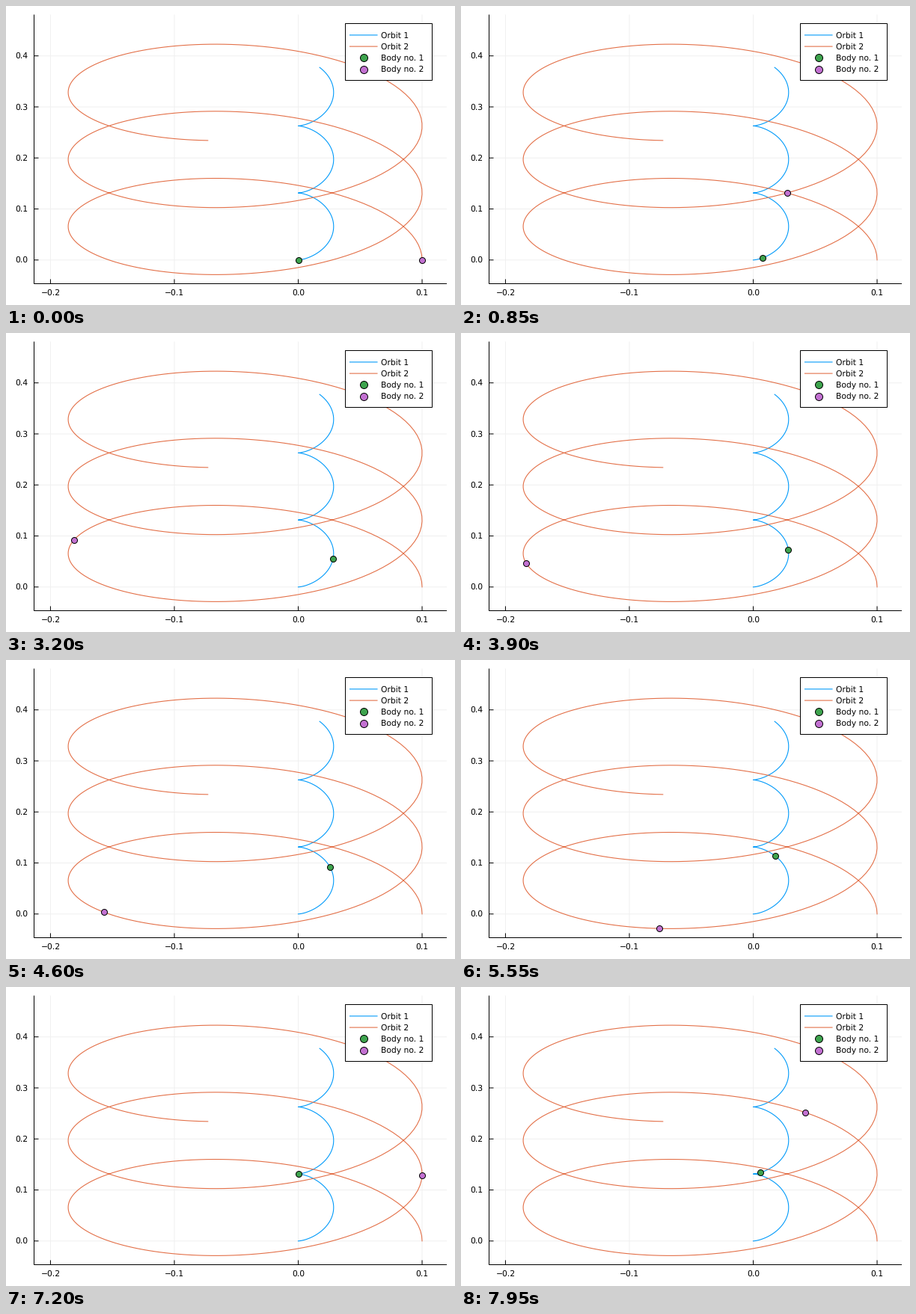
A matplotlib script for the animation above (8000 ms loop, 600 by 400 pixels).

```python
import numpy as np
import matplotlib.pyplot as plt
from matplotlib.animation import FuncAnimation

DPI = 100
PX = 72 / DPI            # points per pixel
FRAMES, INTERVAL = 160, 50

BLUE, ORANGE = "#009afa", "#e36f47"
GREEN, PURPLE = "#3ea44e", "#c371d2"

plt.rcParams["text.hinting"] = "none"

# Two bodies of mass 1 and 0.1: the heavy one starts at rest,
# the light one at periapsis with 1.5 times the circular energy.
M1, M2, R0 = 1.0, 0.1, 0.1
M = M1 + M2
SPEED = np.sqrt(1.5 * M1 / R0)
ECC = SPEED**2 * R0 / M - 1
A = R0 / (1 - ECC)
B = A * np.sqrt(1 - ECC**2)
PERIOD = 2 * np.pi * np.sqrt(A**3 / M)
STEP = 0.006932 * PERIOD
STEPS = 400


def bodies(t):
    """Positions (x1, y1, x2, y2) at time t from Kepler's equation."""
    mean = 2 * np.pi * np.asarray(t, float) / PERIOD
    e = mean + ECC * np.sin(mean)
    for _ in range(12):
        e = e - (e - ECC * np.sin(e) - mean) / (1 - ECC * np.cos(e))
    rx, ry = A * (np.cos(e) - ECC), B * np.sin(e)
    cx, cy = M2 / M * R0, M2 / M * SPEED * t
    return (cx - M2 / M * rx, cy - M2 / M * ry,
            cx + M1 / M * rx, cy + M1 / M * ry)


def sx(x):
    return 390.5 + 1655.3 * x


def sy(y):
    return 339.8 - 682.7 * y


fig = plt.figure(figsize=(600 / DPI, 400 / DPI), dpi=DPI, facecolor="white")
ax = fig.add_axes([0, 0, 1, 1])
ax.set_xlim(0, 600)
ax.set_ylim(400, 0)
ax.axis("off")

LEFT, RIGHT, TOP, BOTTOM = 37.5, 588.5, 12, 371.5


def line(x, y, color="black", width=1.0, **kw):
    return ax.plot(x, y, color=color, lw=width * PX, snap=False, **kw)[0]


def label(x, y, text, align):
    ax.text(x, y, text, ha=align, va="baseline", fontsize=10.8 * PX,
            family="DejaVu Sans", color="black", zorder=6)


def dot(x, y, color, size, z):
    return ax.plot([x], [y], "o", ms=size * PX, mfc=color, mec="black",
                   mew=PX, snap=False, zorder=z)[0]


def tick_text(v):
    return f"{v:.1f}".replace("-", "\u2212")


for v in (-0.2, -0.1, 0.0, 0.1):
    x = sx(v)
    line([x, x], [TOP, BOTTOM], "#f0f0f0", zorder=1)
    line([x, x], [BOTTOM - 5.5, BOTTOM], zorder=2)
    label(x, 386.4, tick_text(v), "center")

for v in (0.0, 0.1, 0.2, 0.3, 0.4):
    y = sy(v)
    line([LEFT, RIGHT], [y, y], "#f0f0f0", zorder=1)
    line([LEFT, LEFT + 5.5], [y, y], zorder=2)
    label(29.5, y + 3.5, tick_text(v), "right")

line([LEFT, LEFT, RIGHT], [TOP, BOTTOM, BOTTOM], zorder=2)

x1, y1, x2, y2 = bodies(np.arange(STEPS + 1) * STEP)
line(sx(x1), sy(y1), BLUE, 1.1, zorder=3)
line(sx(x2), sy(y2), ORANGE, 1.1, zorder=3)

# Legend
ax.add_patch(plt.Rectangle((453.5, 23.5), 116, 76, fc="white", ec="black",
                           lw=PX, snap=False, zorder=5))
entries = [("Orbit 1", BLUE), ("Orbit 2", ORANGE),
           ("Body no. 1", GREEN), ("Body no. 2", PURPLE)]
for i, (text, color) in enumerate(entries):
    y = 38.9 + 15.2 * i
    if i < 2:
        line([459.5, 496], [y, y], color, 1.1, zorder=6)
    else:
        dot(477.6, y, color, 10, 6)
    label(501.2, y + 3.5, text, "left")

first = dot(sx(0), sy(0), GREEN, 8, 4)
second = dot(sx(R0), sy(0), PURPLE, 8, 4)


def update(i):
    xa, ya, xb, yb = bodies(i * STEP)
    first.set_data([sx(xa)], [sy(ya)])
    second.set_data([sx(xb)], [sy(yb)])
    return first, second


anim = FuncAnimation(fig, update, frames=FRAMES, interval=INTERVAL,
                     repeat=True, repeat_delay=0, blit=False)
plt.show()
```
